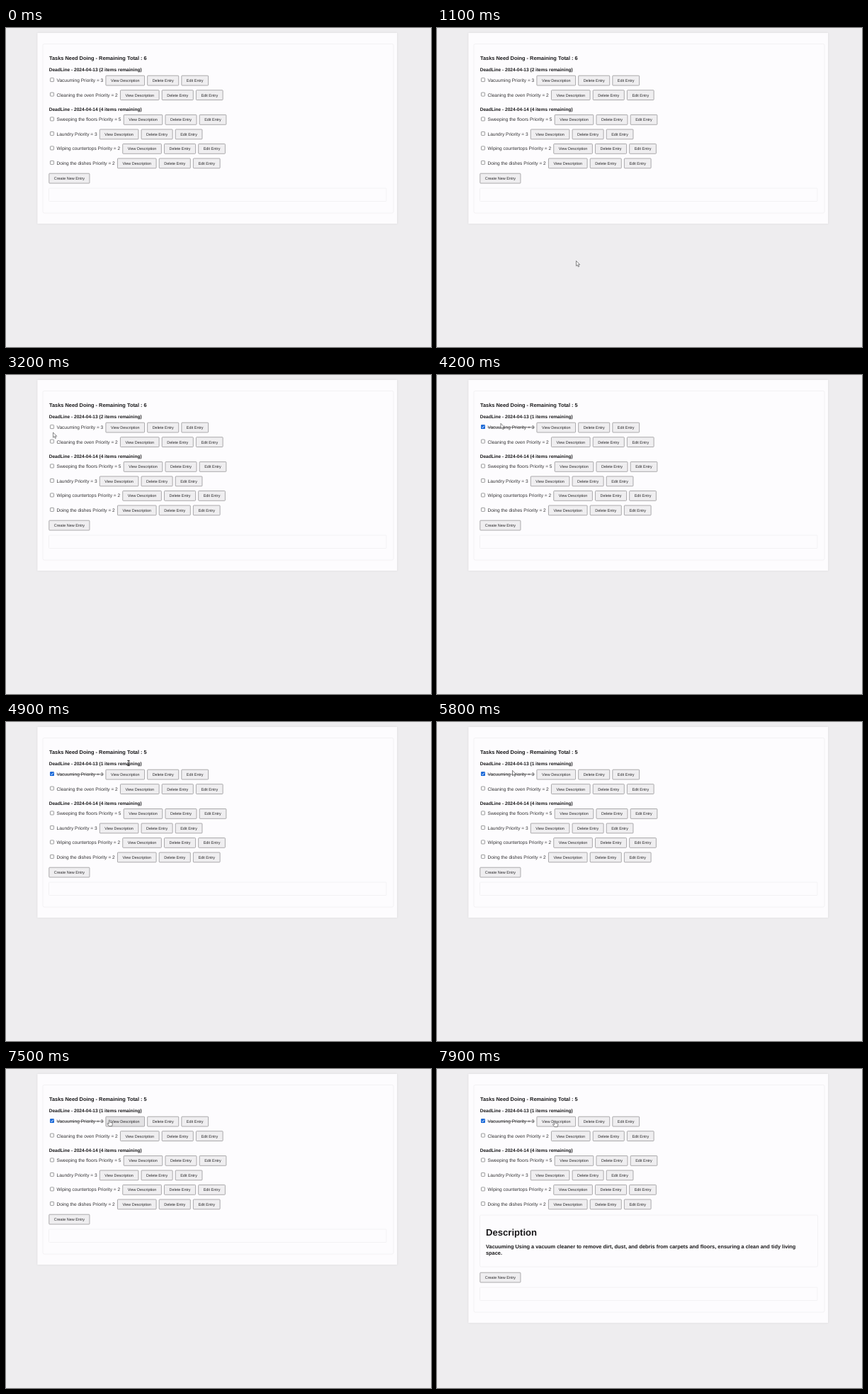
Recreate the animation shown at these times as an HTML page. Size 600x450 px, loop 8000 ms.

```html
<!DOCTYPE html>
<html lang="en">
<head>
<meta charset="utf-8">
<title>Task list</title>
<style>
  html, body { margin: 0; width: 100%; height: 100%; overflow: hidden; background: #eeedef; }
  svg { display: block; width: 600px; height: 450px; }
  text { font-family: "Liberation Sans", Arial, sans-serif; font-size: 6.57px; fill: #343335; text-rendering: geometricPrecision; }
  .bold { font-weight: bold; fill: #1a191b; }
  .title { font-size: 7.4px; }
  .big { font-size: 13.12px; }
  .btn rect { fill: #efeef0; stroke: #979698; stroke-width: .8; }
  .btn text { font-size: 5.47px; fill: #29282a; }
  .card { fill: #fdfcfe; stroke: #f3f2f4; stroke-width: 1; }
  .box { fill: #fff; stroke: #858486; stroke-width: .8; }
  .ink { fill: #fff; stroke: #484749; stroke-width: .65; stroke-linejoin: round; }
</style>
</head>
<body>
<svg id="stage" viewBox="0 0 600 450">
  <defs>
    <filter id="soft" x="-5%" y="-5%" width="110%" height="110%">
      <feDropShadow dx="0" dy="0" stdDeviation="1.6" flood-color="#000" flood-opacity=".08"/>
    </filter>
  </defs>
  <rect width="600" height="450" fill="#eeedef"/>
  <rect id="panel" x="44.5" y="7" width="507.5" height="269" fill="#fdfcfe" filter="url(#soft)"/>
  <rect id="inner" class="card" x="52" y="22.5" width="495" height="238.5" rx="2"/>
  <g id="list"></g>
  <g id="done">
    <rect x="62.1" y="70.3" width="5.8" height="5.8" rx=".9" fill="#1467dc"/>
    <path d="M63.3 73.3L64.5 74.5L66.8 71.7" fill="none" stroke="#fff" stroke-width=".9"/>
    <path d="M71.5 73.8H138" stroke="#343335" stroke-width=".6"/>
  </g>
  <g id="details">
    <rect class="card" x="60.5" y="206" width="477" height="73" rx="2"/>
    <text class="bold big" x="69" y="234.8">Description</text>
    <text class="bold title" x="69" y="253.4">Vacuuming Using a vacuum cleaner to remove dirt, dust, and debris from carpets and floors, ensuring a clean and tidy living</text>
    <text class="bold title" x="69" y="261.7">space.</text>
  </g>
  <g id="footer">
    <rect class="card" x="60.5" y="226" width="476.5" height="18.5" rx="1"/>
  </g>
  <g id="cursor">
    <path id="arrow" class="ink" d="M0 0V7.2L1.7 5.7L2.9 8.4L4.1 7.9L2.9 5.3H5.2Z"/>
    <path id="beam" d="M-1.7 -3.6H1.7M-1.7 3.6H1.7M0 -3.6V3.6" fill="none" stroke="#222" stroke-width=".9"/>
    <path id="hand" class="ink" d="M-.8 .4Q0 -.5 .8 .4V3.2L3.9 4Q4.6 4.3 4.4 5.2L3.6 8.6H-.6L-3 5.4Q-3 4.3 -1.9 4.7L-.8 5.6Z"/>
  </g>
</svg>
<script>
const $ = id => document.getElementById(id);
const LOOP = 8000, STEP = 100, CHECK = 4200, OPEN = 7800, GROW = 82;
const ROW = 20.5, PAD = 7, GAP = 4.1;

function add(parent, tag, attrs, label) {
  const el = document.createElementNS("http://www.w3.org/2000/svg", tag);
  for (const key in attrs) el.setAttribute(key, attrs[key]);
  if (label) el.textContent = label;
  return parent.appendChild(el);
}

// Draws a button as wide as its label needs.
function button(parent, x, y, label) {
  const g = add(parent, "g", { class: "btn" });
  const box = add(g, "rect", { x, y, height: 13.8, rx: .8 });
  const text = add(g, "text", { x: x + PAD, y: y + 8.8 }, label);
  const width = text.getComputedTextLength() + 2 * PAD;
  box.setAttribute("width", width);
  return { box, right: x + width };
}

const list = $("list");

function task(label, y) {
  add(list, "rect", { class: "box", x: 62.5, y: y + 3.4, width: 5, height: 5, rx: .6 });
  const text = add(list, "text", { x: 71.5, y: y + 8.8 }, label);
  const x = 71.5 + text.getComputedTextLength() + GAP - .4;
  const view = button(list, x, y, "View Description");
  const remove = button(list, view.right + GAP, y, "Delete Entry");
  button(list, remove.right + GAP, y, "Edit Entry");
  return view.box;
}

function day(y, tasks) {
  const heading = add(list, "text", { class: "bold", x: 60.7, y });
  const views = tasks.map((label, i) => task(label + " ", y + 6 + i * ROW));
  return { heading, views };
}

const title = add(list, "text", { class: "bold title", x: 61, y: 44.9 });
const first = day(61.2, ["Vacuuming Priority = 3", "Cleaning the oven Priority = 2"]);
const second = day(116.5, [
  "Sweeping the floors Priority = 5", "Laundry Priority = 3",
  "Wiping countertops Priority = 2", "Doing the dishes Priority = 2"
]);
second.heading.textContent = "DeadLine - 2024-04-14 (4 items remaining)";
button($("footer"), 60.8, 205.2, "Create New Entry");

// Pointer moves; the pointer rests between them. "via" bends a move.
const origin = [221, 333];
const moves = [
  { from: 1000, to: 1200, at: [172, 324] },
  { from: 1300, to: 1600, at: [105.5, 295] },
  { from: 2000, to: 2300, at: [70, 321] },
  { from: 2400, to: 3200, at: [66.5, 81], via: [-64, 195] },
  { from: 3200, to: 3600, at: [90, 68.3] },
  { from: 4700, to: 4900, at: [173, 58] },
  { from: 4900, to: 5600, at: [189, 57], via: [220, 30] },
  { from: 5600, to: 5800, at: [106.5, 68.3] },
  { from: 6500, to: 7500, at: [146, 72], via: [320, -2] },
  { from: 7500, to: 7700, at: [166.5, 73] }
];

const ease = k => k * k * (3 - 2 * k);
const mix = (a, b, k) => a.map((v, i) => v + (b[i] - v) * k);

function pointAt(t) {
  let p = origin;
  for (const { from, to, at, via } of moves) {
    if (t < from) break;
    const k = ease(Math.min(1, (t - from) / (to - from)));
    p = via ? mix(mix(p, via, k), mix(via, at, k), k) : mix(p, at, k);
  }
  return p;
}

function over(el, [x, y]) {
  const b = el.getBBox();
  return x >= b.x && x <= b.x + b.width && y >= b.y && y <= b.y + b.height;
}

const show = (el, on) => el.setAttribute("display", on ? "inline" : "none");

function draw(time) {
  const t = Math.floor(time % LOOP / STEP) * STEP;
  const checked = t >= CHECK, open = t >= OPEN, grow = open ? GROW : 0;

  title.textContent = `Tasks Need Doing - Remaining Total : ${checked ? 5 : 6}`;
  first.heading.textContent = `DeadLine - 2024-04-13 (${checked ? 1 : 2} items remaining)`;
  show($("done"), checked);
  show($("details"), open);
  $("panel").setAttribute("height", 269 + grow);
  $("inner").setAttribute("height", 238.5 + grow);
  $("footer").setAttribute("transform", `translate(0 ${grow})`);

  const p = pointAt(t);
  const onButton = over(first.views[0], p);
  const onText = over(title, p) || over(first.heading, p);
  first.views[0].style.fill = onButton && !open ? "#e3e2e4" : "";
  show($("cursor"), t >= moves[0].from);
  show($("hand"), onButton);
  show($("beam"), onText);
  show($("arrow"), !onButton && !onText);
  $("cursor").setAttribute("transform", `translate(${p})`);
}

const start = performance.now();
function tick() {
  draw(performance.now() - start);
  requestAnimationFrame(tick);
}
draw(0);
requestAnimationFrame(tick);
</script>
</body>
</html>
```
